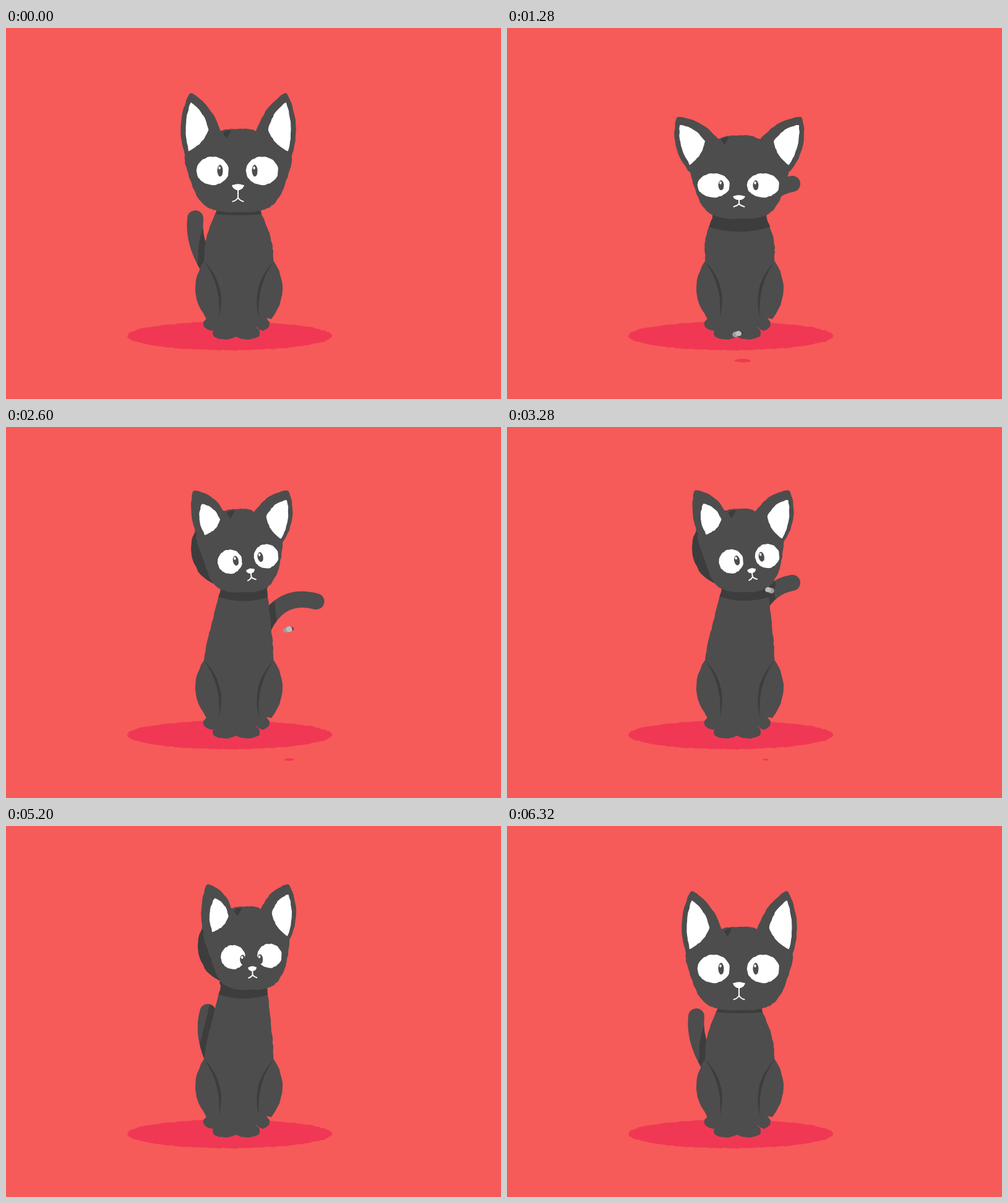
Recreate the animation shown at these times as an HTML page with a canvas. Size 800x600 px, loop 6360 ms.

```html
<!DOCTYPE html>
<html lang="en">
<head>
<meta charset="utf-8">
<title>Cat and fly</title>
<style>
html, body { margin: 0; width: 100%; height: 100%; overflow: hidden; background: #f65a59; }
canvas { display: block; width: 800px; height: 600px; }
</style>
</head>
<body>
<canvas id="stage" width="800" height="600"></canvas>
<script>
const LOOP = 6360, STEP = 40;
const BG = '#f65a59', FLOOR = '#f03854', FUR = '#4d4d4d', DARK = '#3d3d3d', WHITE = '#fff';
const main = document.getElementById('stage').getContext('2d');
const layer = document.createElement('canvas');
layer.width = 800;
layer.height = 600;
const back = layer.getContext('2d');

// x, y: skull centre; pitch: looking down; turn: head swung aside; look: face shift;
// roll: extra face tilt; cross: crossed eyes; open: mouth; earX, earY: ear tips
const upright = { x: 375.5, y: 231, tilt: 0, pitch: 0, turn: 0, look: 0, roll: 0, cross: 0, open: 0, earX: 76, earY: -122 };
const crouch = { ...upright, y: 241.5, pitch: 1, earX: 98, earY: -94 };
const lean = { ...crouch, x: 364, y: 236, tilt: -0.15, look: 6.5, earX: 85, earY: -98 };
const turned = { ...lean, x: 377, y: 200, tilt: 0, turn: 1, look: 16, roll: -0.15, earX: 74, earY: -94 };
const gulp = { ...turned, x: 382, y: 198.5, look: 13.5, roll: -0.09, cross: 1, open: 1 };
const tall = { ...gulp, x: 388, y: 198, look: 10, roll: -0.035, open: 0, earX: 64, earY: -100 };

const acts = [
  [0, upright], [120, upright], [800, crouch], [1320, crouch], [1960, lean], [2040, lean], [2640, turned],
  [3400, turned], [3900, gulp], [4500, gulp], [5100, tall], [5300, tall], [6160, upright], [LOOP, upright]
];

// Tail curves; swing 0 rests, 1 is raised, 2 reaches out
const tails = [
  [350,420, 318,380, 302,345, 306,308],
  [390,390, 385,310, 415,260, 461,252],
  [405,392, 432,290, 478,275, 535,307]
];
const swings = [[0, 0], [640, 1.33], [1280, 1], [2000, 2], [3280, 1], [4360, 0.5], [5200, 0.13], [6240, 0], [LOOP, 0]];

const FLY_END = 3840;
const flight = [[0, [-30, 455]], [640, [236, 478]], [1280, [372, 495]], [2000, [468, 393]], [3280, [424, 264]], [FLY_END, [398, 245]]];

const mix = (a, b, u) => a + (b - a) * u;
const clamp = u => Math.max(0, Math.min(1, u));
const ease = u => u * u * (3 - 2 * u);

function locate(keys, t) {
  let i = 0;
  while (i < keys.length - 2 && t >= keys[i + 1][0]) i++;
  return [i, clamp((t - keys[i][0]) / (keys[i + 1][0] - keys[i][0]))];
}

function poseAt(t) {
  const [i, u] = locate(acts, t), a = acts[i][1], b = acts[i + 1][1], out = {};
  for (const k in a) out[k] = mix(a[k], b[k], ease(u));
  return out;
}

function tailAt(t) {
  const [i, u] = locate(swings, t), swing = mix(swings[i][1], swings[i + 1][1], ease(u));
  const n = Math.min(1, Math.floor(swing));
  return tails[n].map((v, k) => mix(v, tails[n + 1][k], swing - n));
}

function cubic(a, b, c, d, u) {
  return b + u * (c - a + u * (2 * a - 5 * b + 4 * c - d + u * (3 * b - 3 * c + d - a))) / 2;
}

function flyAt(t) {
  const [i, u] = locate(flight, t);
  const at = k => flight[Math.max(0, Math.min(flight.length - 1, k))][1];
  return at(i).map((v, n) => cubic(at(i - 1)[n], v, at(i + 1)[n], at(i + 2)[n], u));
}

// Closed smooth curve through points
function spline(pts, n = 9) {
  const count = pts.length, out = [];
  for (let i = 0; i < count; i++) {
    const [a, b, c, d] = [-1, 0, 1, 2].map(k => pts[(i + k + count) % count]);
    for (let k = 0; k < n; k++) out.push([0, 1].map(q => cubic(a[q], b[q], c[q], d[q], k / n)));
  }
  return out;
}

// Closed outline of bulging edges: each corner is x, y, bulge of the next edge
function bowed(corners, side = 1) {
  const out = [];
  corners.forEach(([x, y, h], i) => {
    const [x2, y2] = corners[(i + 1) % corners.length];
    const dx = x2 - x, dy = y2 - y, len = Math.hypot(dx, dy) || 1;
    for (let k = 0; k < 12; k++) {
      const u = k / 12, b = 4 * u * (1 - u) * h * side / len;
      out.push([x + dx * u + dy * b, y + dy * u - dx * b]);
    }
  });
  return out;
}

// A power below 1 makes the oval boxier
function oval(x, y, rx, ry, power = 1, n = 40) {
  const bend = v => Math.sign(v) * Math.abs(v) ** power;
  return Array.from({ length: n }, (_, i) => {
    const a = i / n * Math.PI * 2;
    return [x + bend(Math.cos(a)) * rx, y + bend(Math.sin(a)) * ry];
  });
}

function jitter(i) {
  const v = Math.sin(i * 12.9898 + 4.1) * 43758.5453;
  return v - Math.floor(v) - 0.5;
}

function trace(g, pts, rough = 1.3) {
  g.beginPath();
  pts.forEach(([x, y], i) => g.lineTo(x + jitter(i) * rough, y + jitter(i + 500) * rough));
  g.closePath();
}

function fill(pts, color, rough, edge = 0) {
  trace(main, pts, rough);
  main.fillStyle = main.strokeStyle = color;
  main.fill();
  if (edge) {
    main.lineWidth = edge;
    main.lineJoin = 'round';
    main.stroke();
  }
}

function neckOf(p) {
  const mid = 375.5 + 8.5 * p.turn, half = 36 + 8 * p.pitch - 6 * p.turn;
  return { left: mid - half, right: mid + half, y: p.y + 66 };
}

function torsoOf(p) {
  const { left, right, y } = neckOf(p), belly = 5 - 4 * p.turn, midY = (y + 376) / 2;
  return spline([
    [left + 5, y - 14], [left, y], [(left + 320) / 2 - belly, midY], [320, 376], [320, 440], [336, 488],
    [400, 488], [424, 440], [432, 376], [(right + 432) / 2 + belly, midY], [right, y], [right - 5, y - 14]
  ]);
}

function drawTail(t, torso) {
  const p = tailAt(t);
  back.clearRect(0, 0, 800, 600);
  back.globalCompositeOperation = 'source-over';
  back.lineCap = back.lineJoin = 'round';
  back.lineWidth = 26;
  back.strokeStyle = FUR;
  back.beginPath();
  back.moveTo(p[0], p[1]);
  back.bezierCurveTo(...p.slice(2));
  back.stroke();
  back.globalCompositeOperation = 'source-atop';
  back.lineWidth = 20;
  back.strokeStyle = DARK;
  trace(back, torso);
  back.stroke();
  main.drawImage(layer, 0, 0);
}

function drawCollar(p, torso) {
  const { left, right, y } = neckOf(p);
  const depth = 6 + 16 * p.pitch - 7 * p.turn, edge = y + depth - 3 - 7 * p.pitch;
  main.save();
  trace(main, torso);
  main.clip();
  main.beginPath();
  main.moveTo(left - 12, y - 40);
  main.lineTo(left - 12, edge);
  main.quadraticCurveTo((left + right) / 2, 2 * (y + depth) - edge, right + 12, edge);
  main.lineTo(right + 12, y - 40);
  main.fillStyle = DARK;
  main.fill();
  main.restore();
}

function drawLegs() {
  const haunch = bowed([[320, 377, 13], [344, 469, 0], [324, 470, 16]]);
  const fold = bowed([[321, 378, 13], [344, 469, -8.5]]);
  for (const side of [p => p, p => p.map(([x, y]) => [753 - x, y])]) {
    fill(side(haunch), FUR);
    fill(side(fold), DARK, 0.5);
  }
  main.strokeStyle = DARK;
  main.lineWidth = 2.5;
  main.lineCap = 'round';
  for (const x of [0, 36]) {
    fill(oval(332 + x * 2.3, 478.5, 13 - x / 18, 10.5), FUR);
    fill(oval(354 + x, 493.5, 19.5, 9.8, 0.75), FUR);
  }
  for (const x of [0, 36]) {
    main.beginPath();
    main.moveTo(366 + x, 485);
    main.quadraticCurveTo(375 + x, 488, 372 + x, 498);
    main.stroke();
  }
}

function skullOf({ pitch, turn }) {
  const w = 1 - 0.06 * pitch - 0.14 * turn;
  const half = [[27, -65], [56, -50], [86, -26], [76, 20], [59, 52], [33, 65]];
  const right = half.map(([x, y]) => [x * w + (y > 0 ? 5 * turn : 0), y]);
  const left = half.map(([x, y]) => [-x * w + (y > 0 ? 5 * turn : 0), y]).reverse();
  return spline([[0, -68], ...right, [5 * turn, 67], ...left]);
}

function drawEar(p, side) {
  const { pitch, turn } = p, low = pitch - turn;
  const tip = [side * p.earX + 3 * turn, p.earY];
  const inner = [side * (31 + 5 * low - 5 * turn), -58];
  const outer = [side * (82 - 2 * low - 15 * turn), -25 + 11 * low + 8 * turn * side];
  const blend = (b, c, h) => [0, 1].map(q =>
    tip[q] * (1 - b - c) + inner[q] * b + outer[q] * c + turn * (q ? 7 - 4 * side : 6 - 5 * side)).concat(h);
  fill(bowed([[...tip, 7], [...inner, 0], [...outer, 10 - 3 * turn * (1 - side)]], -side), FUR, 1.3, 8);
  if (side < 0) {
    const [x, y] = inner;
    fill([[x + 6, y - 3], [x + 12, y - 7], [x + 19, y - 7], [x + 12, y + 6]], DARK, 0.5);
  }
  fill(bowed([blend(0, 0.12, 5), blend(0.63, 0.16, 5), blend(0.03, 0.9, 6)], -side), WHITE, 1.2, 1);
}

function drawEye(p, side) {
  const x = side * (40 - 10.5 * p.turn);
  const px = side * (28 - 8 * p.turn - 6 * p.cross), py = 5 * p.cross, ph = 9.5 - 1.5 * p.pitch;
  fill(oval(x, 0, 25.7 - 6.3 * p.turn, 22.7 - 3.4 * p.pitch, 0.93), WHITE);
  fill(oval(px, py, 4.5, ph, 1, 20), FUR, 0.5);
  fill(oval(px - 1, py - ph * 0.5, 1.7, 2.4, 1, 12), WHITE, 0);
}

function drawMuzzle({ pitch, turn, open }) {
  const a = 10 - 3 * turn, b = 5 - 1.5 * pitch, y = 26.5 - 6.5 * pitch;
  const lip = y + 17 - 7 * pitch, w = 8.5 - 2 * turn, drop = 6 - 1.5 * pitch;
  fill(bowed([[1 - a, y - b * 0.6, 2], [1 + a, y - b * 0.6, 2], [1, y + b, 2]]), WHITE, 0.4);
  main.strokeStyle = WHITE;
  main.lineWidth = 2;
  main.lineCap = main.lineJoin = 'round';
  main.beginPath();
  main.moveTo(1, y);
  main.lineTo(1, lip);
  for (const s of [-1, 1]) {
    main.moveTo(1, lip);
    main.quadraticCurveTo(1 + s * w * 0.4, lip + drop - 1, 1 + s * w, lip + drop);
  }
  main.stroke();
  if (open > 0.02) {
    fill(bowed([[1, lip - 3 * open, 0], [1 + 6 * open, lip + 2 * open, 1], [1, lip + 11 * open, 1], [1 - 6 * open, lip + 2 * open, 0]]), WHITE, 0.5);
  }
}

function drawHead(p) {
  main.save();
  main.translate(p.x, p.y);
  main.rotate(p.tilt);
  fill(oval(-20 * p.turn, -4 * p.turn, 58, 61, 1, 60), DARK);
  fill(skullOf(p), FUR);
  drawEar(p, -1);
  drawEar(p, 1);
  main.translate(p.look - 1.5, 13 * p.pitch);
  main.rotate(p.roll);
  drawEye(p, -1);
  drawEye(p, 1);
  drawMuzzle(p);
  main.restore();
}

function drawFly(x, y, t) {
  const flap = t / STEP % 2 ? 0.6 : 0, dir = t > 2640 ? -1 : 1;
  fill(oval(x + 5 * dir, y - 1.5, 4.5, 3, 1, 16), DARK, 0.4);
  fill(oval(x - 3 * dir, y + 0.8, 5, 4.6 - flap, 1, 16), '#9c9c9c', 0.6);
  fill(oval(x + 2 * dir, y - 0.8, 5.2, 4.2 + flap, 1, 16), '#bcbcbc', 0.6);
}

function drawFlyShadow(x, y, t) {
  const r = 13 * Math.sqrt(Math.max(0, y - 230) / 265);
  const shift = mix(9, -6, ease(clamp((t - 2000) / 1280)));
  fill(oval(x + shift, 538, r, 0.7 + r * 0.17, 1, 20), FLOOR, 0.5);
}

function draw(t) {
  const p = poseAt(t), torso = torsoOf(p), flying = t <= FLY_END, [fx, fy] = flyAt(t);
  main.fillStyle = BG;
  main.fillRect(0, 0, 800, 600);
  fill(oval(361.5, 498, 165.5, 23, 1, 150), FLOOR, 1.5);
  if (flying) drawFlyShadow(fx, fy, t);
  drawTail(t, torso);
  fill(torso, FUR);
  drawCollar(p, torso);
  drawLegs();
  drawHead(p);
  if (flying) drawFly(fx, fy, t);
}

const start = performance.now();
function tick() {
  const t = (performance.now() - start) % LOOP;
  draw(Math.floor(t / STEP) * STEP);
  requestAnimationFrame(tick);
}
tick();
</script>
</body>
</html>
```
